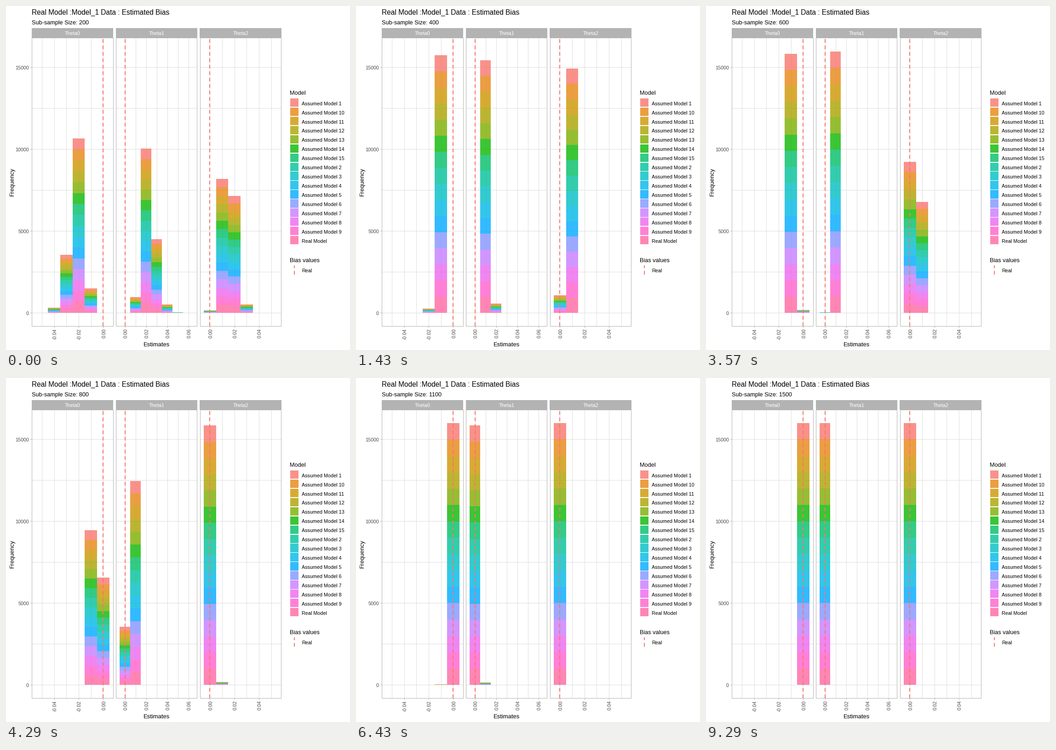
A matplotlib script that plays this animation: 748 px wide and 748 px high, repeating every 10 s.

```python
from math import erf, log, sqrt

import matplotlib.pyplot as plt
import numpy as np
from matplotlib.animation import FuncAnimation
from matplotlib.patches import Rectangle

W = 748
DPI = 100
PX = 72 / DPI
TOTAL = 16000
TOP, BOTTOM, BASE = 69, 696, 667.2
UNIT = 569.6 / TOTAL
GRID, GRAY = "#DEDEDE", "#B3B3B3"

MODELS = sorted("Assumed Model %d" % k for k in range(1, 16)) + ["Real Model"]

# left, right, x of zero, width of a 0.01 bin, grid bins,
# then the bias law: sign, median and spread at size 200, decay, skew
PANELS = [(56.5, 233, 211.2, 26.65, range(-5, 1),
           (-1, 0.02095, 0.2525, 1.014, 0)),
          (239.5, 415.5, 258.7, 23.0, range(0, 7),
           (1, 0.02215, 0.25, 1.009, 0)),
          (422, 598.5, 443.4, 26.65, range(0, 6),
           (1, 0.01475, 0.141, 1.016, 1.35))]


def hcl(hue, chroma=100, lum=65):
    """Polar CIE-LUV colour as sRGB."""
    h = np.radians(hue)
    u = chroma * np.cos(h) / (13 * lum) + 0.1978
    v = chroma * np.sin(h) / (13 * lum) + 0.4683
    y = ((lum + 16) / 116) ** 3
    x = 9 * y * u / (4 * v)
    z = 3 * y / v - x / 3 - 5 * y
    rgb = np.clip([3.2405 * x - 1.5371 * y - 0.4985 * z,
                   -0.9693 * x + 1.8760 * y + 0.0416 * z,
                   0.0556 * x - 0.2040 * y + 1.0572 * z], 0, 1)
    return np.clip(np.where(rgb > 0.00304, 1.055 * rgb ** (1 / 2.4) - 0.055,
                            12.92 * rgb), 0, 1)


COLORS = [hcl(15 + 360 * k / len(MODELS)) for k in range(len(MODELS))]


def histogram(size, sign, median, spread, decay, skew):
    """Counts per 0.01 bin of a skewed bias that shrinks with sample size."""
    mid = median * (size / 200) ** -decay
    sd = spread * (size / 200) ** -0.55
    below = 0
    for b in range(6):
        edge = (b + 0.5) / 100
        score = log((edge / mid + skew) / (1 + skew)) / sd
        upto = round(TOTAL * (1 + erf(score / sqrt(2))) / 2)
        yield sign * b, upto - below
        below = upto


plt.rcParams["font.family"] = "Liberation Sans"
fig = plt.figure(figsize=(W / DPI, W / DPI), dpi=DPI, facecolor="white")
ax = fig.add_axes([0, 0, 1, 1])
ax.set_xlim(0, W)
ax.set_ylim(W, 0)
ax.axis("off")


def text(x, y, s, size, color="black", **kw):
    kw.setdefault("va", "baseline")
    return ax.text(x, y, s, fontsize=size * PX, color=color, **kw)


def line(x, y, color, z, width=1, **kw):
    ax.plot(x, y, color=color, lw=width * PX, zorder=z, **kw)


def box(x, y, w, h, z, **kw):
    return ax.add_patch(Rectangle((x, y), w, h, zorder=z, **kw))


def dashed(x, y0, y1):
    line([x, x], [y0, y1], COLORS[0], 4, 2, dashes=(4, 3))


def level(count):
    return BASE - count * UNIT


def draw_panel(name, left, right, zero, step, bins):
    for count in range(0, 15001, 2500):
        line([left, right], [level(count)] * 2, GRID, 1)
    for b in bins:
        x = zero + b * step
        line([x, x], [TOP, BOTTOM], GRID, 1)
        if b % 2 == 0:
            line([x, x], [BOTTOM, BOTTOM + 3], GRAY, 1)
            text(x + 2, 701.5, "%.2f" % (b / 100), 10.8, "#4D4D4D",
                 rotation=90, ha="center", va="top")
    dashed(zero, BOTTOM, TOP)
    box(left, TOP, right - left, BOTTOM - TOP, 5, fill=False, ec=GRAY, lw=PX)
    box(left - 0.5, 48, right - left + 1, TOP - 48, 6, fc=GRAY, lw=0)
    text((left + right) / 2, 63, name, 10.8, "white", ha="center", zorder=7)


def draw_legend():
    text(617, 193, "Model", 12.7)
    for i, (color, label) in enumerate(zip(COLORS, MODELS)):
        y = 201 + 19.93 * i
        box(618, y, 18, 18.4, 2, fc=color, alpha=0.8, lw=0)
        text(643, y + 14.7, label, 10.75)
    text(617, 557, "Bias values", 12.7)
    dashed(627, 584, 564)
    text(643, 579, "Real", 10.75)


text(56.5, 19, "Real Model :Model_1 Data : Estimated Bias", 15.5)
subtitle = text(56.5, 40, "", 12.6)
text(327.5, 740, "Estimates", 13, ha="center")
text(20, 382.5, "Frequency", 13, rotation=90, ha="right", va="center")
for count in range(0, 15001, 5000):
    y = level(count)
    line([53, 56], [y, y], GRAY, 1)
    text(50, y + 4.5, str(count), 10.8, "#4D4D4D", ha="right")
for i, (*layout, _) in enumerate(PANELS):
    draw_panel("Theta%d" % i, *layout)
draw_legend()

bars = []


def update(i):
    while bars:
        bars.pop().remove()
    size = 200 + 100 * i
    subtitle.set_text("Sub-sample Size: %d" % size)
    for _, _, zero, step, _, law in PANELS:
        for b, count in histogram(size, *law):
            part = count / len(COLORS)
            for k, color in enumerate(reversed(COLORS)):
                if count:
                    bars.append(box(zero + (b - 0.5) * step, level(k * part),
                                    step, -part * UNIT, 3, fc=color,
                                    alpha=0.8, lw=0))
    return bars + [subtitle]


anim = FuncAnimation(fig, update, frames=14, interval=10000 / 14, repeat=True,
                     repeat_delay=0, init_func=lambda: update(0), blit=False)
plt.show()
```
